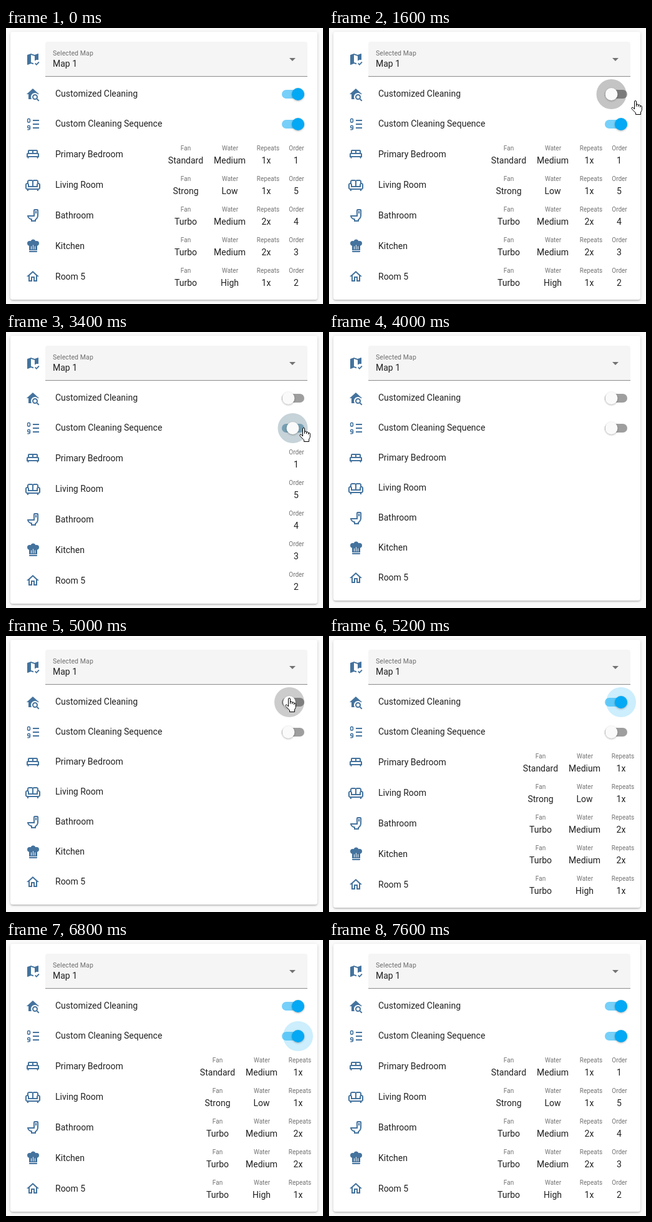
An HTML page with a canvas for the animation above (9.4 s loop, 508 by 442 pixels).

```html
<!DOCTYPE html>
<html lang="en">
<head>
<meta charset="utf-8">
<title>Cleaning settings card</title>
<style>
html, body { margin: 0; width: 508px; height: 442px; overflow: hidden; background: #fafafa; }
canvas { display: block; }
</style>
</head>
<body>
<canvas id="stage" width="508" height="442"></canvas>
<script>
const ctx = document.getElementById('stage').getContext('2d');
const LOOP = 9400;
const FONT = 'Roboto, Arial, sans-serif';
const ICON = '#44739e';

const icons = {
  map: 'M9 3L3.36 4.9C3.16 4.97 3 5.15 3 5.38V20.5C3 20.78 3.22 21 3.5 21L3.66 20.97L9 18.9L13.16 20.36C13.06 19.92 13 19.46 13 19C13 18.77 13 18.54 13.04 18.3L9 16.9V5L15 7.1V14.56C16.07 13.6 17.47 13 19 13C19.7 13 20.37 13.13 21 13.36V3.5C21 3.22 20.78 3 20.5 3L20.34 3.03L15 5.1ZM17.75 22L15 19L16.16 17.84L17.75 19.43L21.34 15.84L22.5 17.25Z',
  homeSearch: 'M15.5 12C18 12 20 14 20 16.5C20 17.38 19.75 18.21 19.31 18.9L22.39 22L21 23.39L17.88 20.32C17.19 20.75 16.37 21 15.5 21C13 21 11 19 11 16.5C11 14 13 12 15.5 12M15.5 14A2.5 2.5 0 0 0 15.5 19A2.5 2.5 0 0 0 15.5 14M10 20H5V12H2L12 3L22 12H19.92C18.8 10.8 17.24 10 15.5 10C11.91 10 9 12.91 9 16.5C9 17.79 9.37 19 10 20Z',
  order: 'M12 5H22V7H12ZM12 11H22V13H12ZM12 17H22V19H12ZM5.5 2.5A2.7 2.7 0 0 1 8.2 5.2V7.3A2.7 2.7 0 0 1 2.8 7.3V5.2A2.7 2.7 0 0 1 5.5 2.5M5.5 4.1A1.1 1.1 0 0 0 4.4 5.2V7.3A1.1 1.1 0 0 0 6.6 7.3V5.2A1.1 1.1 0 0 0 5.5 4.1M5.5 13.5A2.7 2.7 0 0 1 8.2 16.2V18.8A2.7 2.7 0 0 1 5.5 21.5H3.3V19.9H5.5A1.1 1.1 0 0 0 6.6 18.8H5.5A2.6 2.6 0 0 1 5.5 13.5M5.5 15.1A1.05 1.05 0 0 0 5.5 17.2H6.6V16.2A1.1 1.1 0 0 0 5.5 15.1',
  bed: 'M20 10V7C20 5.9 19.1 5 18 5H6C4.9 5 4 5.9 4 7V10C2.9 10 2 10.9 2 12V17H3.33L4 19H5L5.67 17H18.33L19 19H20L20.67 17H22V12C22 10.9 21.1 10 20 10M11 10H6V7H11V10M18 10H13V7H18V10M20 15H4V12H20V15Z',
  sofa: 'M21 9V7C21 5.35 19.65 4 18 4H14C13.23 4 12.53 4.3 12 4.78C11.47 4.3 10.77 4 10 4H6C4.35 4 3 5.35 3 7V9C1.35 9 0 10.35 0 12V17C0 18.65 1.35 20 3 20V22H5V20H19V22H21V20C22.65 20 24 18.65 24 17V12C24 10.35 22.65 9 21 9M14 6H18C18.55 6 19 6.45 19 7V9.78C18.39 10.33 18 11.12 18 12V14H13V7C13 6.45 13.45 6 14 6M5 7C5 6.45 5.45 6 6 6H10C10.55 6 11 6.45 11 7V14H6V12C6 11.12 5.61 10.33 5 9.78V7M22 17C22 17.55 21.55 18 21 18H3C2.45 18 2 17.55 2 17V12C2 11.45 2.45 11 3 11S4 11.45 4 12V16H20V12C20 11.45 20.45 11 21 11S22 11.45 22 12V17Z',
  toilet: 'M9 22H17V19.5C19.41 17.87 21 15.12 21 12V4A2 2 0 0 0 19 2H15A2 2 0 0 0 13 4V12H3C3 15.3 5.5 18.2 9 19.2ZM5.3 14H15V4H19V12C19 15.2 17 17.4 15 18.4V20H11V17.6C8.5 17.4 6.2 16.2 5.3 14ZM16 5H18V9H16Z',
  chef: 'M12.5 1.5C10.73 1.5 9.17 2.67 8.67 4.37C8.14 4.13 7.58 4 7 4A4 4 0 0 0 3 8C3 9.82 4.24 11.41 6 11.87V19H19V11.87C20.76 11.41 22 9.82 22 8A4 4 0 0 0 18 4C17.42 4 16.86 4.13 16.33 4.37C15.83 2.67 14.27 1.5 12.5 1.5M12 10.5H13V17.5H12V10.5M9 12.5H10V17.5H9V12.5M15 12.5H16V17.5H15V12.5M6 20V21A1 1 0 0 0 7 22H18A1 1 0 0 0 19 21V20H6Z',
  home: 'M12 5.69L17 10.19V18H15V12H9V18H7V10.19L12 5.69M12 3L2 12H5V20H11V14H13V20H19V12H22L12 3Z'
};
const pointers = {
  arrow: 'M.5 .5V16.5L4.2 13L6.6 18.5L9 17.5L6.7 12H11.8Z',
  hand: 'M5.5 14V2A1.5 1.5 0 0 1 8.5 2V9.5V7.5A1.5 1.5 0 0 1 11.5 7.5V10V8.5A1.5 1.5 0 0 1 14.5 8.5V11V10A1.4 1.4 0 0 1 17.3 10V15.5L15.5 19V22.5H7.5V20L1.2 13.5C.2 12 1.6 10.6 3 11.2Z'
};
for (const set of [icons, pointers])
  for (const key in set) set[key] = new Path2D(set[key]);

const rooms = [
  ['Primary Bedroom', 'bed', 'Standard', 'Medium', '1x', '1'],
  ['Living Room', 'sofa', 'Strong', 'Low', '1x', '5'],
  ['Bathroom', 'toilet', 'Turbo', 'Medium', '2x', '4'],
  ['Kitchen', 'chef', 'Turbo', 'Medium', '2x', '3'],
  ['Room 5', 'home', 'Turbo', 'High', '1x', '2']
];
// label, label centre, value centre
const columns = [['Fan', 288, 288], ['Water', 359, 358.5], ['Repeats', 420, 417], ['Order', 465.5, 465]];

const BLUE = '#03a9f4', PALE = '#fafafa';
const on = { x: 468, track: 'rgba(3,169,244,.54)', thumb: BLUE };
const off = { x: 452.5, track: 'rgba(0,0,0,.38)', thumb: PALE };
const teal = 'rgba(20,100,140,.48)';
const pressed = 'rgba(60,105,125,.29)';
const black = a => `rgba(0,0,0,${a})`;
const blue = a => `rgba(3,169,244,${a})`;

// Each step changes only the properties it names.
const steps = [
  [0, { custom: on, sequence: on, details: true, ordered: true, pointer: null }],
  [1200, { pointer: ['arrow', 501, 111] }],
  [1400, { custom: { ...off, x: 454 }, pointer: ['hand', 472, 108] }],
  [1600, { custom: { ...off, ripple: black(.23) }, pointer: ['hand', 484, 116] }],
  [1800, { custom: { ...off, ripple: black(.12) }, details: false, pointer: null }],
  [2000, { custom: off }],
  [3000, { pointer: ['arrow', 504, 165] }],
  [3200, { sequence: { ...on, x: 464 }, pointer: ['hand', 476, 158] }],
  [3400, { sequence: { x: 459.5, track: teal, thumb: PALE, ripple: pressed }, pointer: ['hand', 470, 153] }],
  [3600, { sequence: { ...off, ripple: black(.12) }, ordered: false, pointer: null }],
  [3800, { sequence: { ...off, ripple: black(.1) } }],
  [4000, { sequence: off }],
  [4600, { pointer: ['arrow', 499, 153] }],
  [4800, { pointer: ['hand', 447, 99] }],
  [5000, { custom: { ...off, x: 454, ripple: black(.2) } }],
  [5200, { custom: { ...on, ripple: blue(.2) }, details: true, pointer: null }],
  [5400, { custom: { ...on, ripple: blue(.1) } }],
  [5600, { custom: on }],
  [6200, { pointer: ['hand', 478, 170] }],
  [6400, { sequence: { ...off, ripple: black(.04) }, pointer: ['hand', 473, 165] }],
  [6600, { sequence: { ...on, ripple: blue(.26) } }],
  [6800, { sequence: { ...on, ripple: blue(.2) }, pointer: null }],
  [7200, { ordered: true }],
  [7600, { sequence: on }]
];
const stateAt = t => Object.assign({}, ...steps.filter(s => s[0] <= t).map(s => s[1]));

function text(str, x, y, size = 14, color = '#212121', align = 'left') {
  ctx.font = `${size}px ${FONT}`;
  ctx.fillStyle = color;
  ctx.textAlign = align;
  ctx.fillText(str, x, y);
}

function shape(color, x, y, w, h, radius) {
  ctx.fillStyle = color;
  ctx.beginPath();
  ctx.roundRect(x, y, w, h, radius);
  ctx.fill();
}

function disc(color, x, y, r) {
  ctx.fillStyle = color;
  ctx.beginPath();
  ctx.arc(x, y, r, 0, Math.PI * 2);
  ctx.fill();
}

function withShadow(alpha, blur, dy, draw) {
  ctx.save();
  ctx.shadowColor = black(alpha);
  ctx.shadowBlur = blur;
  ctx.shadowOffsetY = dy;
  draw();
  ctx.restore();
}

function icon(name, cy) {
  ctx.save();
  ctx.translate(31, cy - 12);
  ctx.fillStyle = ICON;
  ctx.fill(icons[name], 'evenodd');
  ctx.restore();
}

function toggle({ x, track, thumb, ripple }, y) {
  shape(track, 442, y - 7, 36, 14, 7);
  if (ripple) disc(ripple, x, y, 24);
  withShadow(.3, 3, 1, () => disc(thumb, x, y, 10));
}

function card(bottom) {
  const panel = () => shape('#fff', 7, 6, 492, bottom - 6, 4);
  withShadow(.14, 2, 2, panel);
  withShadow(.14, 5, 1, panel);
}

function mapSelect() {
  icon('map', 50);
  shape('#f5f5f5', 63, 22, 420, 56, [4, 4, 0, 0]);
  ctx.fillStyle = '#8b8b8b';
  ctx.fillRect(63, 77, 420, 1);
  ctx.letterSpacing = '0.1px';
  text('Selected Map', 75, 44, 10.5, '#6d6d6d');
  ctx.letterSpacing = '0px';
  text('Map 1', 75, 62);
  ctx.fillStyle = '#737373';
  ctx.fill(new Path2D('M454 48H464L459 53Z'));
}

function roomRow([name, glyph, ...values], i, { details, ordered }) {
  const expanded = details || ordered;
  const y = 202 + i * (expanded ? 49 : 48);
  icon(glyph, y);
  text(name, 79, y + (expanded ? 5 : 4));
  columns.forEach(([label, labelX, valueX], c) => {
    if (c === 3 ? !ordered : !details) return;
    const shift = ordered ? 0 : 51;
    text(label, labelX + shift, y - 6, 10, '#727272', 'center');
    text(values[c], valueX + shift, y + 15, 14, '#212121', 'center');
  });
}

function drawPointer([kind, x, y]) {
  ctx.save();
  ctx.translate(x, y);
  ctx.fillStyle = '#fff';
  ctx.strokeStyle = '#000';
  ctx.lineJoin = 'round';
  ctx.fill(pointers[kind]);
  ctx.stroke(pointers[kind]);
  ctx.restore();
}

function render(t) {
  const state = stateAt(t);
  ctx.fillStyle = '#fafafa';
  ctx.fillRect(0, 0, 508, 442);
  card(state.details || state.ordered ? 435 : 430);
  mapSelect();
  icon('homeSearch', 106);
  text('Customized Cleaning', 79, 110);
  icon('order', 154);
  text('Custom Cleaning Sequence', 79, 158);
  rooms.forEach((room, i) => roomRow(room, i, state));
  toggle(state.custom, 106);
  toggle(state.sequence, 154);
  if (state.pointer) drawPointer(state.pointer);
}

const start = performance.now();
function tick() {
  render((performance.now() - start) % LOOP);
  requestAnimationFrame(tick);
}
tick();
</script>
</body>
</html>
```
